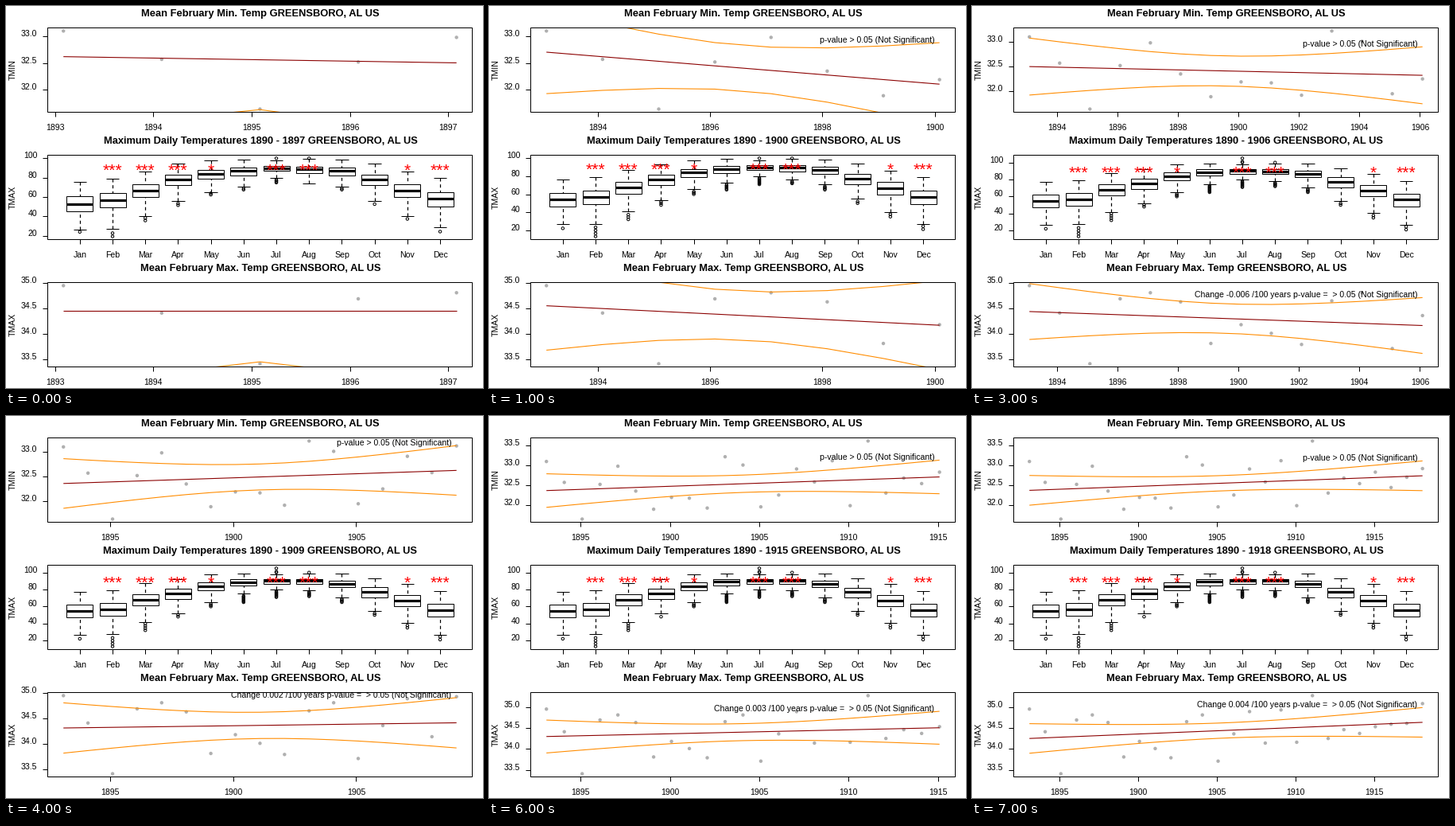
Recreate the animation shown at these times as a matplotlib script. Size 600 px wide and 480 px high, loop 8 s.

```python
import matplotlib.pyplot as plt
import numpy as np
from matplotlib.animation import FuncAnimation
from matplotlib.patches import Circle, Rectangle

plt.rcParams["font.family"] = "Liberation Sans"

W, H = 600, 480
PX = 0.72  # points per pixel at 100 dpi
LEFT, RIGHT = 52, 586
BOX_H = 106
PAD = 0.04 / 1.08
FIRST, STEP, STAGES = 1893, 3, 8
FEB = 0.085  # position of 1 February within a year
PLACE = "GREENSBORO, AL US"
MONTHS = "Jan Feb Mar Apr May Jun Jul Aug Sep Oct Nov Dec".split()
STARS = dict(Feb=3, Mar=3, Apr=3, May=1, Jul=3, Aug=3, Nov=1, Dec=3)

# Yearly February means, as hundredths above the coldest one
TMIN = 31.64 + np.array([
    146, 93, 0, 88, 134, 71, 25, 55, 53, 28, 158, 137, 31,
    61, 127, 94, 148, 34, 198, 66, 104, 90, 119, 80, 106, 128]) / 100
TMAX = 33.41 + np.array([
    154, 100, 0, 128, 140, 122, 40, 77, 60, 38, 124, 140, 30,
    95, 148, 73, 152, 75, 186, 84, 105, 96, 112, 118, 120, 167]) / 100

# Monthly key values; the early medians differ by DRIFT
MEDIAN = [55, 57, 68, 75, 84, 89, 90, 90, 87, 77, 67, 56]
COLDEST = [22, 13, 32, 48, 60, 65, 71, 72, 65, 50, 35, 21]
DRIFT = dict(Jan=-2, Mar=-1, Apr=3, Jun=-2, Aug=-1.5, Oct=1, Dec=2)

fig = plt.figure(figsize=(W / 100, H / 100), dpi=100, facecolor="white")
ax = fig.add_axes([0, 0, 1, 1])


def line(xs, ys, color="black", width=1, **kw):
    return ax.plot(xs, ys, color=color, lw=width * PX, solid_capstyle="butt", **kw)[0]


def label(x, y, s, size=10.55, ha="center", **kw):
    return ax.text(x, y, s, fontsize=size * PX, ha=ha, va="baseline", **kw)


def y_scale(top, low, high):
    """Map data to pixels, leaving a 4 % margin at both ends."""
    base = top + BOX_H * (1 - PAD)
    k = BOX_H * (1 - 2 * PAD) / (high - low)
    return lambda v: base - (np.asarray(v) - low) * k


def t_quantile(df, z=1.96):
    """Two-sided 95 % Student quantile, expanded around the normal one."""
    return (z + (z**3 + z) / (4 * df)
            + (5 * z**5 + 16 * z**3 + 3 * z) / (96 * df**2)
            + (3 * z**7 + 19 * z**5 + 17 * z**3 - 15 * z) / (384 * df**3))


def panel(top, title, name, y, y_ticks, fmt, x_ticks):
    """Frame, axes and titles; returns the frame for clipping."""
    bottom = top + BOX_H
    box = ax.add_patch(Rectangle((LEFT, top), RIGHT - LEFT, BOX_H, fill=False,
                                 ec="black", lw=PX, zorder=3))
    for v in y_ticks:
        ty = float(y(v))
        if top <= ty <= bottom:
            line([LEFT - 6, LEFT], [ty, ty])
            label(39, ty, format(v, fmt), ha="right")
    for tx, s in x_ticks:
        if LEFT <= tx <= RIGHT:
            line([tx, tx], [bottom, bottom + 6])
            label(tx, bottom + 23, s)
    label(319.5, top - 14, title, 12.85, weight="bold")
    label(11, top + BOX_H / 2, name, rotation=90, rotation_mode="anchor")
    return box


def trend(top, kind, series, n, with_change):
    vals = series[:n]
    t = np.arange(n)
    y = y_scale(top, vals.min(), vals.max())
    margin = (RIGHT - LEFT) * PAD
    year_px = (RIGHT - LEFT - 2 * margin) / (n - 1)
    xs = LEFT + margin + t * year_px

    step = 1 if n < 6 else 2 if n < 15 else 5
    years = [k for k in range(FIRST, FIRST + n + 1) if k % step == 0]
    x_ticks = [(xs[0] + (k - FIRST - FEB) * year_px, str(k)) for k in years]
    box = panel(top, f"Mean February {kind}. Temp {PLACE}", f"T{kind.upper()}", y,
                np.arange(31, 36.5, 0.5), ".1f", x_ticks)

    slope, start = np.polyfit(t, vals, 1)
    fit = start + slope * t
    dev = t - t.mean()
    sigma = np.sqrt(((vals - fit) ** 2).sum() / (n - 2))
    band = t_quantile(n - 2) * sigma * np.sqrt(1 / n + dev**2 / (dev**2).sum())

    for px, py in zip(xs, y(vals)):
        ax.add_patch(Circle((px, py), 2.2, fc="#b0b0b0", lw=0))
    line(xs, y(fit), "#8b0000", 1.1)
    for edge in (fit - band, fit + band):
        line(xs, y(edge), "#ff8c00", 1.1).set_clip_path(box)

    note = "p-value > 0.05 (Not Significant)"
    if with_change:
        note = f"Change {0.27 * slope:.1g} /100 years p-value =  > 0.05 (Not Significant)"
    label(560, y(fit[-1] + band[-1]), note, ha="right",
          clip_on=True).set_clip_path(box)


def month_stats(m, last):
    """Whiskers, quartiles, median and outliers of one month up to a year."""
    age = last - 1897
    med = MEDIAN[m] + DRIFT.get(MONTHS[m], 0) * np.exp(-age / 4)
    cold = np.sqrt((90 - med) / 35)  # 0 in midsummer, about 1 in midwinter
    q1, q3 = med - 3 - 5 * cold, med + 2 + 5.5 * cold
    low = max(q1 - 1.45 * (q3 - q1), 26.5)
    high = q3 + 0.85 * (q3 - q1) + 1.5

    # Records deepen over the first years
    record = COLDEST[m] + (low - COLDEST[m]) * max(0, 0.45 - 0.15 * age)
    outliers = list(np.arange(record, low - 1.5, 1 + 2.5 * cold**2))
    if MONTHS[m] in ("Jul", "Aug"):
        outliers.append(100)
    if MONTHS[m] == "Jul" and last >= 1903:
        outliers += [101, 105]
    return low, q1, med, q3, high, outliers


def boxplots(top, last):
    stats = [month_stats(m, last) for m in range(12)]
    values = [v for s in stats for v in (s[0], s[4], *s[5])]
    y = y_scale(top, min(values), max(values))
    pitch = (RIGHT - LEFT) / 12.96
    xs = [LEFT + (m + 0.98) * pitch for m in range(12)]
    panel(top, f"Maximum Daily Temperatures 1890 - {last} {PLACE}", "TMAX", y,
          range(20, 101, 20), "d", list(zip(xs, MONTHS)))

    half = 0.4 * pitch
    for x, month, (low, q1, med, q3, high, outliers) in zip(xs, MONTHS, stats):
        for tip, hinge in ((low, q1), (high, q3)):
            line([x, x], y([tip, hinge]), width=1.2, ls=(0, (3.4, 3)))
            line([x - half / 2, x + half / 2], y([tip, tip]))
        ax.add_patch(Rectangle((x - half, y(q3)), 2 * half, y(q1) - y(q3),
                               fc="white", ec="black", lw=PX, zorder=2))
        line([x - half, x + half], y([med, med]), width=3.2, zorder=2.5)
        for v in outliers:
            ax.add_patch(Circle((x, y(v)), 1.7, fill=False, ec="black", lw=PX))
        label(x, y(82), "*" * STARS.get(month, 0), 21.1, color="red", zorder=4)


def draw(i):
    ax.clear()
    # Whole numbers fall just short of pixel centres, so lines snap evenly
    ax.set(xlim=(-0.45, W - 0.45), ylim=(H - 0.45, -0.45))
    ax.axis("off")
    n = 5 + STEP * i
    trend(27, "Min", TMIN, n, False)
    boxplots(187, FIRST + n - 1)
    trend(347, "Max", TMAX, n, True)
    return []


anim = FuncAnimation(fig, draw, frames=STAGES, init_func=lambda: [],
                     interval=1000, repeat=True, repeat_delay=0, blit=False)
plt.show()
```
